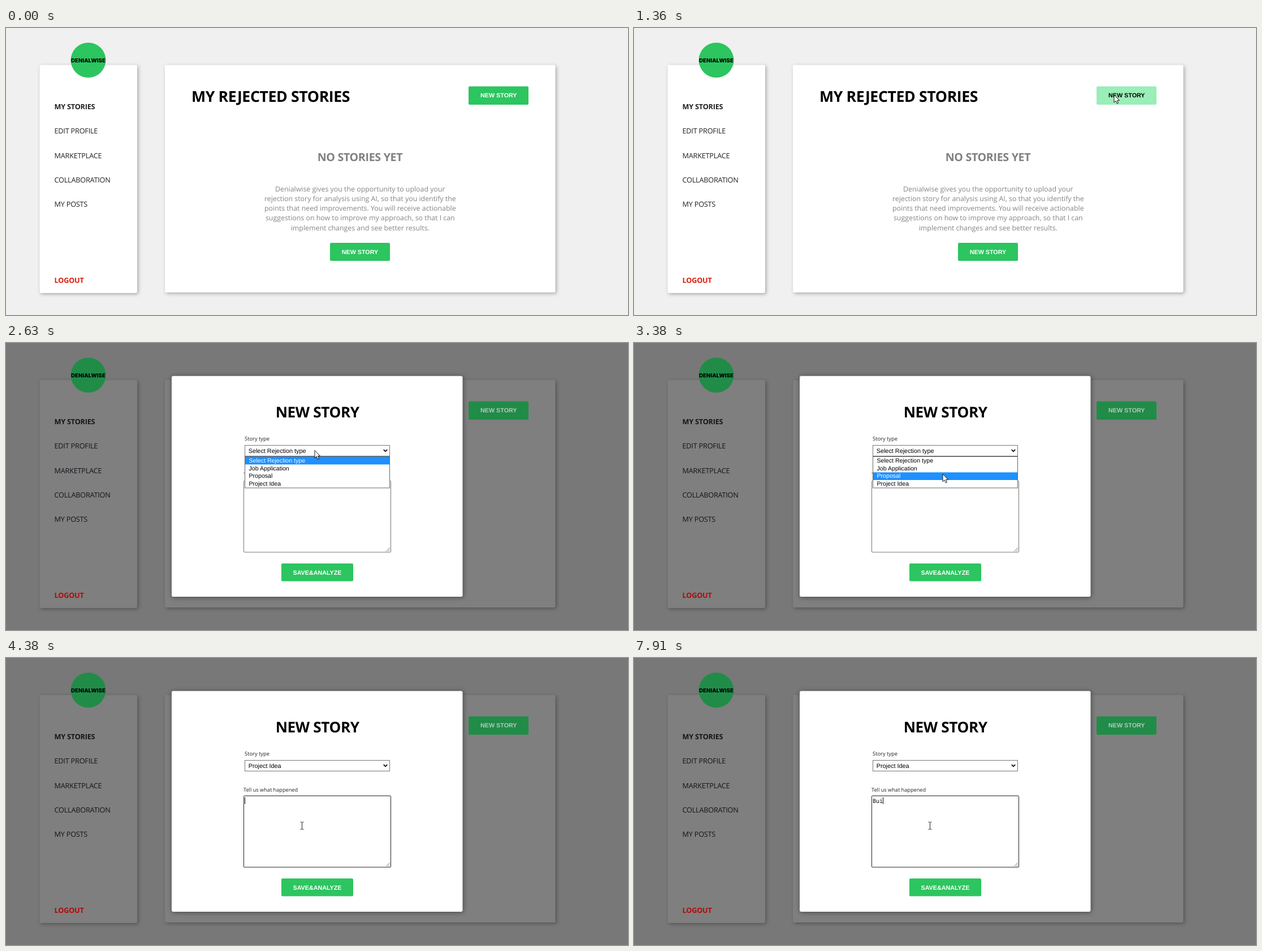
An HTML page that plays this animation: 1100x509 px, repeating every 8000 ms.

```html
<!DOCTYPE html>
<html lang="en">
<head>
<meta charset="utf-8">
<title>New story</title>
<style>
  html, body { margin: 0; width: 100%; height: 100%; overflow: hidden; }
  svg {
    display: block; background: var(--page);
    font-family: "Open Sans", "Noto Sans", sans-serif; text-rendering: geometricPrecision;
    --page: #f0f0f0; --card: #fff; --green: #2cc55f; --ink: #222; --label: #fff; --red: #dd1c0c;
  }
  svg.dim { --page: #787878; --card: #7f7f7f; --green: #208c48; --ink: #15151c; --label: #b9c6be; --red: #b30a0a; }
  .card { fill: var(--card); filter: drop-shadow(2px 2px 3px rgba(0, 0, 0, .3)); }
  .caps { letter-spacing: -.015em; }
  .bold { font-weight: 700; }
  .mid { text-anchor: middle; }
  .green { fill: var(--green); }
  .arial { font-family: "Liberation Sans", Arial, sans-serif; }
  .label { font: 700 10.75px "Liberation Sans", Arial, sans-serif; text-anchor: middle; fill: var(--label); }
  .hover rect { fill: #9aeeb8; }
  .hover text { fill: #000; }
  #modal .green { fill: #2cc55f; }
  #modal .label { fill: #fff; }
  .field { fill: #fff; stroke: #767676; }
  #area.focus { stroke: #222; }
</style>
</head>
<body>
<svg id="stage" width="1100" height="509" viewBox="0 0 1100 509">
  <rect class="card" x="59.5" y="65.5" width="172.5" height="404.5" rx="3"/>
  <rect class="card" x="281" y="65.5" width="690.5" height="403.5" rx="3"/>
  <circle class="green" cx="145.5" cy="57" r="31"/>
  <text class="mid" x="145.5" y="61" font-family="Inter, sans-serif" font-weight="800" font-size="9.7">DENIALWISE</text>

  <g id="nav" class="caps" font-size="12.65" fill="var(--ink)"></g>
  <text class="caps bold" x="85.5" y="451.5" font-size="12.7" fill="var(--red)">LOGOUT</text>

  <text class="caps bold" x="328" y="130.5" font-size="26.7">MY REJECTED STORIES</text>
  <text class="caps bold mid" x="626" y="235.5" font-size="19.6" fill="#808080">NO STORIES YET</text>
  <g id="intro" class="mid" font-size="12.37" fill="#858585"></g>
  <g id="add">
    <rect class="green" x="818" y="103.5" width="106" height="32.5" rx="2"/>
    <text class="label" x="871.3" y="123">NEW STORY</text>
  </g>
  <rect class="green" x="573" y="381" width="106" height="32" rx="2"/>
  <text class="label" x="626" y="401">NEW STORY</text>

  <g id="modal">
    <rect x="293" y="58.5" width="514.5" height="391.5" rx="3" fill="#fff" style="filter:drop-shadow(1px 1px 4px rgba(0,0,0,.45))"/>
    <text class="caps bold mid" x="550.7" y="132" font-size="26.2">NEW STORY</text>
    <text x="422" y="173" font-size="9.35" fill="#222">Story type</text>
    <rect class="field" x="422.5" y="181.5" width="256" height="19"/>
    <text id="choice" class="arial" x="428.7" y="194.8" font-size="10.85"></text>
    <path d="M667.8 189.2l3.2 3.2 3.2-3.2" fill="none" stroke="#000" stroke-width="1.7"/>
    <text x="420" y="237" font-size="9.2" fill="#222">Tell us what happened</text>
    <rect id="area" class="field" x="420.5" y="244.5" width="260" height="126.5" rx="1"/>
    <path d="M672.5 369.5l6.5-6.5M676 369.5l3-3" stroke="#666" stroke-width=".9"/>
    <text id="typed" x="422" y="257" font-family="Noto Sans Mono, monospace" font-size="10"></text>
    <rect id="caret" y="247" width="1" height="12"/>
    <rect class="green" x="487" y="391" width="127" height="31.5" rx="2"/>
    <text class="label" x="550.5" y="410.6">SAVE&amp;ANALYZE</text>
    <g id="list" class="arial" font-size="10.6">
      <rect x="422.5" y="201.5" width="256" height="55.5" fill="#fff" stroke="#666"/>
      <rect id="bar" x="423" width="255" height="13.6" fill="#1e90ff"/>
    </g>
  </g>

  <g id="cursor">
    <circle id="click" cx="-1" r="10" fill="#e6de00" opacity=".6"/>
    <path id="arrow" d="M0 0V13.5L3.1 10.7L5.3 15.6L7.5 14.6L5.4 9.9H9.5Z" fill="#fff" stroke="#000" stroke-width=".9"/>
    <path id="beam" d="M-3 -6.5H-.8L0 -5.7L.8 -6.5H3M0 -5.7V5.7M-3 6.5H-.8L0 5.7L.8 6.5H3" fill="none" stroke="#222"/>
  </g>
</svg>
<script>
const LOOP = 8000;
const $ = id => document.getElementById(id);
const show = (id, on) => $(id).style.display = on ? '' : 'none';
const within = (t, [a, b]) => t >= a && t < b;

function addText(parent, text, x, y, cls = '') {
  const el = document.createElementNS('http://www.w3.org/2000/svg', 'text');
  el.setAttribute('x', x);
  el.setAttribute('y', y);
  el.setAttribute('class', cls);
  el.textContent = text;
  return $(parent).appendChild(el);
}

['MY STORIES', 'EDIT PROFILE', 'MARKETPLACE', 'COLLABORATION', 'MY POSTS']
  .forEach((s, i) => addText('nav', s, 85.5, 144.3 + i * 43.15, i ? '' : 'bold'));

['Denialwise gives you the opportunity to upload your',
 'rejection story for analysis using AI, so that you identify the',
 'points that need improvements. You will receive actionable',
 'suggestions on how to improve my approach, so that I can',
 'implement changes and see better results.']
  .forEach((s, i) => addText('intro', s, 626.3, 290 + i * 17.15));

const options = ['Select Rejection type', 'Job Application', 'Proposal', 'Project Idea'];
const rows = options.map((s, i) => addText('list', s, 429.5, 212.3 + i * 13.45));

// start, end, steps, destination
const origin = [1054, 509];
const moves = [
  [200, 960, 11, [843, 124]],
  [1030, 1030, 1, [849, 118.5]],
  [1830, 2230, 7, [546, 190.5]],
  [3310, 3440, 3, [546, 247]],
  [3910, 4110, 4, [523.5, 297.5]],
];
const clicks = [[1230, 1360], [2500, 2630], [3840, 3910], [4310, 4380]];
const typing = [[0, ''], [5240, 'B'], [5570, 'Bu'], [5840, 'Bul'], [7250, 'Bu'], [7910, 'Bui']];
const caretOn = [[4380, 4840], [5240, 6390], [6850, 7450], [7910, LOOP]];

function cursorAt(t) {
  let pos = origin;
  for (const [start, end, steps, to] of moves) {
    if (t < start) break;
    const gap = (end - start) / (steps - 1) || 1;
    const p = Math.min(steps, Math.floor((t - start) / gap + .05) + 1) / steps;
    const e = p * p * (3 - 2 * p);
    pos = pos.map((v, i) => v + (to[i] - v) * e);
  }
  return pos;
}

function draw(t) {
  const [x, y] = cursorAt(t);
  const modal = t >= 1430;
  const open = within(t, [2570, 3910]);

  $('stage').classList.toggle('dim', modal);
  show('modal', modal);
  $('add').classList.toggle('hover', !modal && x > 818 && x < 924 && y > 103 && y < 136);

  show('list', open);
  const active = Math.max(0, Math.min(3, Math.floor((y - 201.5) / 13.45)));
  $('bar').setAttribute('y', 201.8 + active * 13.8);
  rows.forEach((row, i) => row.setAttribute('fill', i === active ? '#fff' : '#000'));
  $('choice').textContent = options[t < 3910 ? 0 : 3];

  const text = typing.filter(k => t >= k[0]).pop()[1];
  $('area').classList.toggle('focus', t >= 4380);
  $('typed').textContent = text;
  $('caret').setAttribute('x', 422 + text.length * 6);
  show('caret', caretOn.some(span => within(t, span)));

  const beam = t >= 3910 && y > 244;
  show('cursor', t >= 200);
  $('cursor').setAttribute('transform', `translate(${x} ${y})`);
  show('click', clicks.some(span => within(t, span)));
  show('arrow', !beam);
  show('beam', beam);
}

function tick() {
  draw(performance.now() % LOOP);
  requestAnimationFrame(tick);
}
tick();
</script>
</body>
</html>
```
